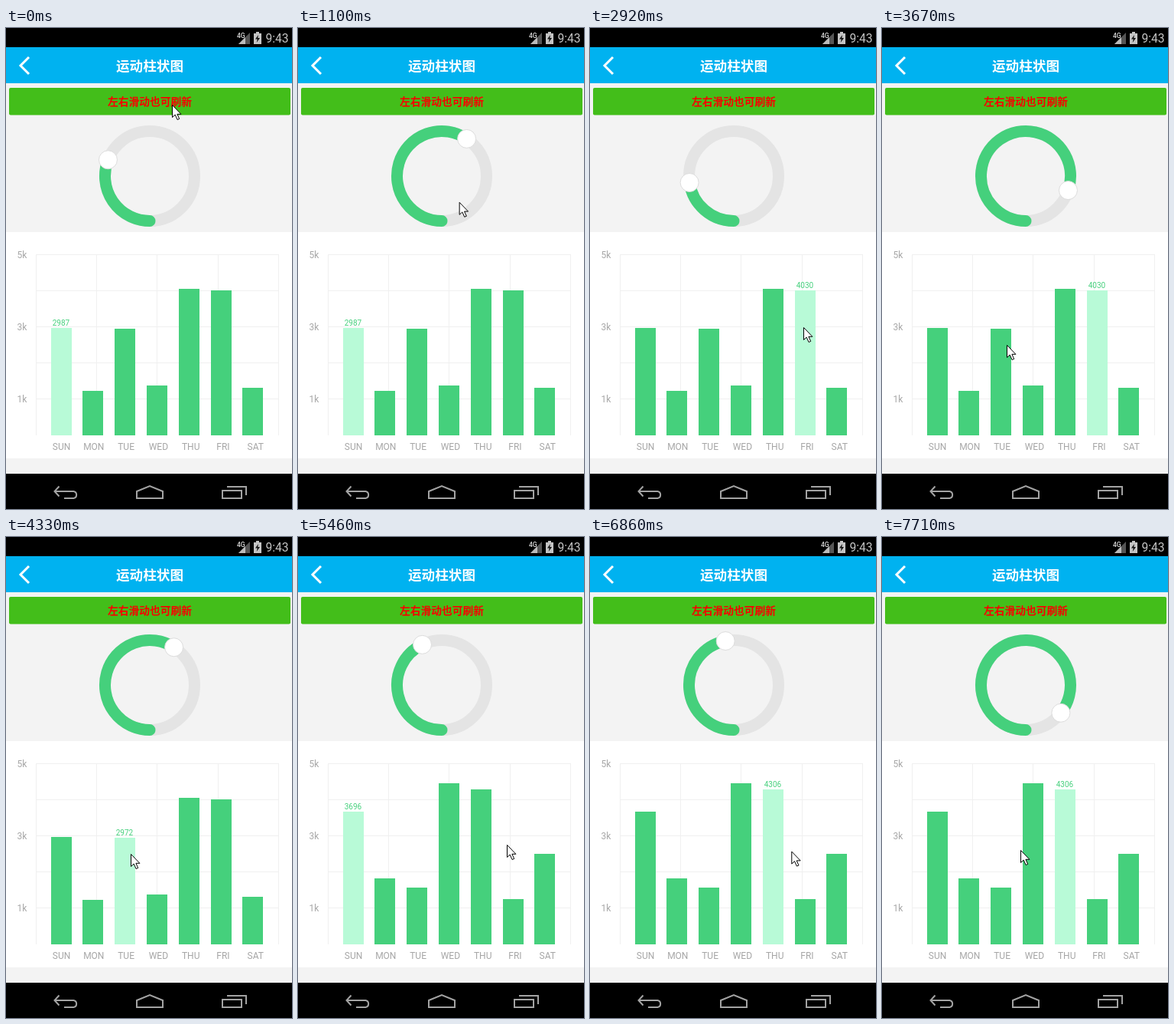
Recreate the animation shown at these times as an HTML page. Size 374 by 627 pixels, loop 8 s.

```html
<!DOCTYPE html>
<html lang="zh-CN">
<head>
<meta charset="utf-8">
<style>
html, body { margin: 0; width: 100%; height: 100%; overflow: hidden; background: #f3f3f3; }
svg { display: block; font-family: Roboto, sans-serif; }
.cjk { font-family: "Noto Sans CJK SC", "Noto Sans CJK", sans-serif; font-weight: 700; text-anchor: middle; }
.axis { font-size: 12px; fill: #a6a6a6; }
.mid { text-anchor: middle; }
.grid { fill: #f0f0f0; }
.icon { fill: none; stroke: #a3a3a3; stroke-width: 2; }
</style>
</head>
<body>
<svg width="374" height="627" viewBox="0 0 374 627">
  <rect width="374" height="627" fill="#f3f3f3"/>
  <rect width="374" height="25"/>
  <text x="302" y="13" font-size="8.5" font-weight="500" fill="#ddd">4G</text>
  <path d="M319 6V21H304Z" fill="#555"/>
  <path d="M313 12V21H304Z" fill="#bbb"/>
  <path d="M324 7H327V5H331V7H334V21H324Z" fill="#c4c4c4"/>
  <path d="M330 9L326 14.5H328.7L327.7 19L332 13H329.3Z" fill="#111"/>
  <text x="339.5" y="19" font-size="15.6" fill="#c4c4c4">9:43</text>

  <rect y="25" width="374" height="47" fill="#00b2f0"/>
  <path d="M30 38L19 49L30 60" fill="none" stroke="#fff" stroke-width="3"/>
  <text class="cjk" x="188" y="56" font-size="17.6" fill="#fff">运动柱状图</text>
  <rect x="4" y="78" width="368" height="35.5" rx="2" fill="#43be1a"/>
  <text class="cjk" x="188" y="101" font-size="13.75" fill="#f80000">左右滑动也可刷新</text>

  <g fill="none" stroke-width="15">
    <circle cx="188" cy="193" r="58.5" stroke="#e4e4e4"/>
    <path id="arc" stroke="#45d07c" stroke-linecap="round"/>
  </g>
  <circle id="knob" r="12" fill="#fff" stroke="#dcdcdc"/>

  <rect y="266" width="374" height="295" fill="#fff"/>
  <g id="chart"></g>
  <text id="label" class="mid" font-size="10" fill="#45d07c"></text>

  <rect y="581" width="374" height="46"/>
  <g class="icon">
    <path d="M69.5 597.5L63.5 604L69.5 610.5M64 604H88.5A4.6 4.6 0 0 1 88.5 613H76"/>
    <path d="M171 613V604L188 597L205 604V613Z"/>
    <path d="M283 603H308V613H283ZM289 598H314V609"/>
  </g>
  <path id="cursor" d="M0 0V16L3.7 12.6L6.6 19L9.2 17.9L6.4 11.8H11.4Z" fill="#fff" stroke="#000"/>
</svg>
<script>
const LOOP = 8000, STEP = 120, RING_TIME = 700, REFRESH = 5310, BASE = 531;
const DAYS = ['SUN', 'MON', 'TUE', 'WED', 'THU', 'FRI', 'SAT'];
const WEEKS = [
  [2987, 1231, 2972, 1391, 4077, 4030, 1316],
  [3696, 1826, 1581, 4470, 4306, 1252, 2515]
];
// lead: how far the ring animation has run when the selection first shows.
const SELECTIONS = [
  { at: 0, lead: 359, day: 0 },
  { at: 1890, lead: 134, day: 4 },
  { at: 2920, lead: 250, day: 5 },
  { at: 3970, lead: 330, day: 2 },
  { at: REFRESH, lead: 267, day: 0 },
  { at: 6590, lead: 132, day: 4 }
];
// Pointer strokes: start, end, target x, target y.
const STROKES = [
  [870, 1240, 207, 310], [1300, 1560, 238.5, 357.5], [2250, 2560, 282, 390], [2850, 3600, 163.5, 413.5],
  [4400, 4900, 136.5, 404.5], [4960, 5160, 273.5, 401.5], [6180, 6320, 247, 406],
  [6640, 7030, 282, 414.5], [7260, 7640, 181.5, 408.5]
];

const $ = id => document.getElementById(id);
const clamp = v => Math.max(0, Math.min(1, v));
const ease = v => 0.5 - 0.5 * Math.cos(Math.PI * clamp(v));
const barX = i => Math.floor(59 + i * 41.8);
const set = (el, attrs) => { for (const k in attrs) el.setAttribute(k, attrs[k]); };

function add(tag, attrs, text = '') {
  const el = document.createElementNS('http://www.w3.org/2000/svg', tag);
  set(el, attrs);
  el.textContent = text;
  return $('chart').appendChild(el);
}

for (let i = 0; i < 5; i++) {
  add('rect', { class: 'grid', x: Math.floor(39 + i * 79.4), y: 295, width: 1, height: 236 });
  add('rect', { class: 'grid', x: 39, y: 295 + i * 47, width: 318, height: 1 });
  if (i % 2 === 0) add('text', { class: 'axis', x: 14.5, y: 300 + i * 47 }, `${5 - i}k`);
}
const bars = DAYS.map((day, i) => {
  add('text', { class: 'axis mid', x: 72.5 + i * 42.3, y: 550 }, day);
  return add('rect', { x: barX(i), width: 27 });
});

function drawPointer(t) {
  let x = 217.5, y = 100.5;
  for (const [start, end, toX, toY] of STROKES) {
    const k = ease((t - start) / (end - start));
    x += (toX - x) * k;
    y += (toY - y) * k;
  }
  set($('cursor'), { transform: `translate(${x} ${y})` });
}

function drawRing(degrees) {
  const a = degrees * Math.PI / 180;
  const x = 188 - 58.5 * Math.sin(a), y = 193 + 58.5 * Math.cos(a);
  set($('arc'), { d: `M188 251.5A58.5 58.5 0 ${degrees > 180 ? 1 : 0} 1 ${x} ${y}` });
  set($('knob'), { cx: x, cy: y });
}

function draw(now) {
  const { at, lead, day } = SELECTIONS.filter(s => s.at <= now).pop();
  // The screen repaints in coarse steps counted from each selection.
  const elapsed = Math.floor((now - at) / STEP) * STEP;
  const t = at + elapsed;
  const fresh = t >= REFRESH;
  const values = WEEKS[fresh ? 1 : 0];
  const grow = fresh ? clamp(0.69 + (t - REFRESH) / 380) : 1;
  const top = i => Math.round(BASE - values[i] * 0.0469 * grow);

  bars.forEach((bar, i) => set(bar, {
    y: top(i), height: BASE - top(i), fill: i === day ? '#b8fad7' : '#45d07c'
  }));
  set($('label'), { x: barX(day) + 13, y: top(day) - 3 });
  $('label').textContent = values[day];
  drawRing(values[day] * 0.0716 * ease((elapsed + lead) / RING_TIME));
  drawPointer(t);
}

function frame() {
  draw(performance.now() % LOOP);
  requestAnimationFrame(frame);
}
frame();
</script>
</body>
</html>
```
